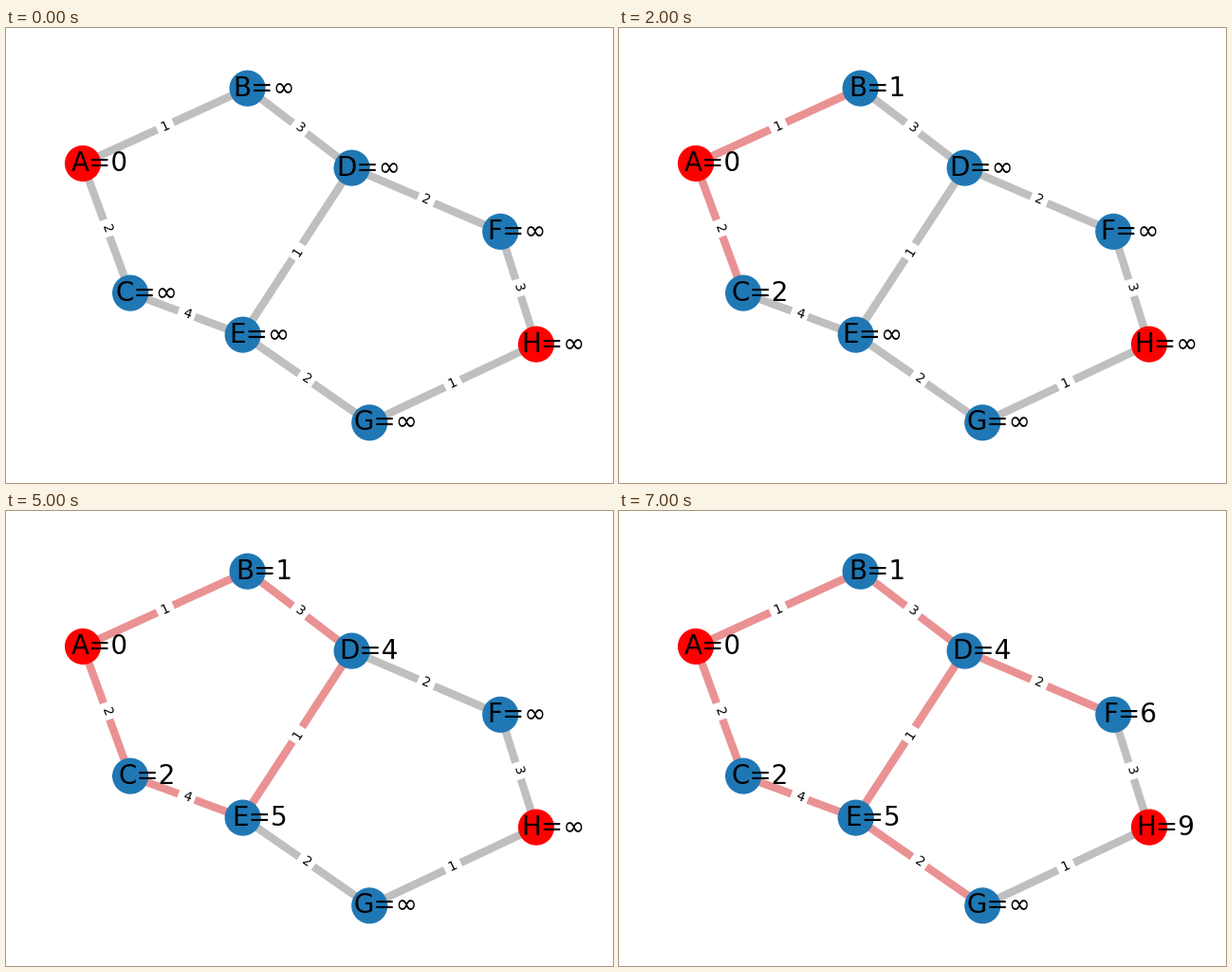
Animation, 640 px wide and 480 px high, one loop 8 s. Source, as a matplotlib script:

```python
import math

import matplotlib.pyplot as plt
from matplotlib.animation import FuncAnimation

WIDTH, HEIGHT, DPI = 640, 480, 100
LABEL_SHIFT = 17.5

# Node centres in pixels, y pointing down.
NODES = {
    "A": (81, 142.9), "B": (254.6, 63.67), "C": (131.1, 279.6), "D": (364.6, 147.6),
    "E": (249.7, 323.6), "F": (521.3, 214.8), "G": (383.3, 416.33), "H": (559, 333.6),
}
EDGES = {"AB": 1, "AC": 2, "BD": 3, "CE": 4, "DE": 1,
         "DF": 2, "EG": 2, "FH": 3, "GH": 1}
ENDS = "AH"

# Each step marks one edge and sets one distance.
STEPS = [("AB", "B", 1), ("AC", "C", 2), ("BD", "D", 4), ("CE", "E", 6),
         ("DE", "E", 5), ("DF", "F", 6), ("EG", "H", 9)]

plt.rcParams["font.family"] = "DejaVu Sans"
fig = plt.figure(figsize=(WIDTH / DPI, HEIGHT / DPI), dpi=DPI, facecolor="white")
ax = fig.add_axes([0, 0, 1, 1])
ax.set_xlim(0, WIDTH)
ax.set_ylim(HEIGHT, 0)
ax.axis("off")


def draw_edge(name, weight):
    (x0, y0), (x1, y1) = NODES[name[0]], NODES[name[1]]
    line, = ax.plot([x0, x1], [y0, y1], lw=6, alpha=0.5,
                    solid_capstyle="butt", zorder=1)
    angle = math.degrees(math.atan2(y0 - y1, x1 - x0))
    if abs(angle) > 90:
        angle -= math.copysign(180, angle)
    ax.text((x0 + x1) / 2, (y0 + y1) / 2, str(weight), size=10,
            ha="center", va="center", rotation=angle, zorder=1.5,
            bbox=dict(boxstyle="round", ec="white", fc="white"))
    return line


def draw_label(name):
    x, y = NODES[name]
    return ax.text(x + LABEL_SHIFT, y, "", size=20,
                   ha="center", va="center", zorder=3)


lines = {name: draw_edge(name, weight) for name, weight in EDGES.items()}
labels = {name: draw_label(name) for name in NODES}

# One collection with mixed colours keeps the discs at sub-pixel positions.
ax.scatter(*zip(*NODES.values()), s=700, linewidths=1, zorder=2,
           c=["red" if name in ENDS else "tab:blue" for name in NODES])


def update(frame):
    done = STEPS[:frame]
    marked = {edge for edge, _, _ in done}
    dist = {"A": 0, **{node: value for _, node, value in done}}
    for name, line in lines.items():
        line.set_color("tab:red" if name in marked else "gray")
    for name, label in labels.items():
        label.set_text(f"{name}={dist.get(name, '∞')}")
    return [*lines.values(), *labels.values()]


anim = FuncAnimation(fig, update, frames=len(STEPS) + 1, interval=1000, repeat=True)
plt.show()
```
